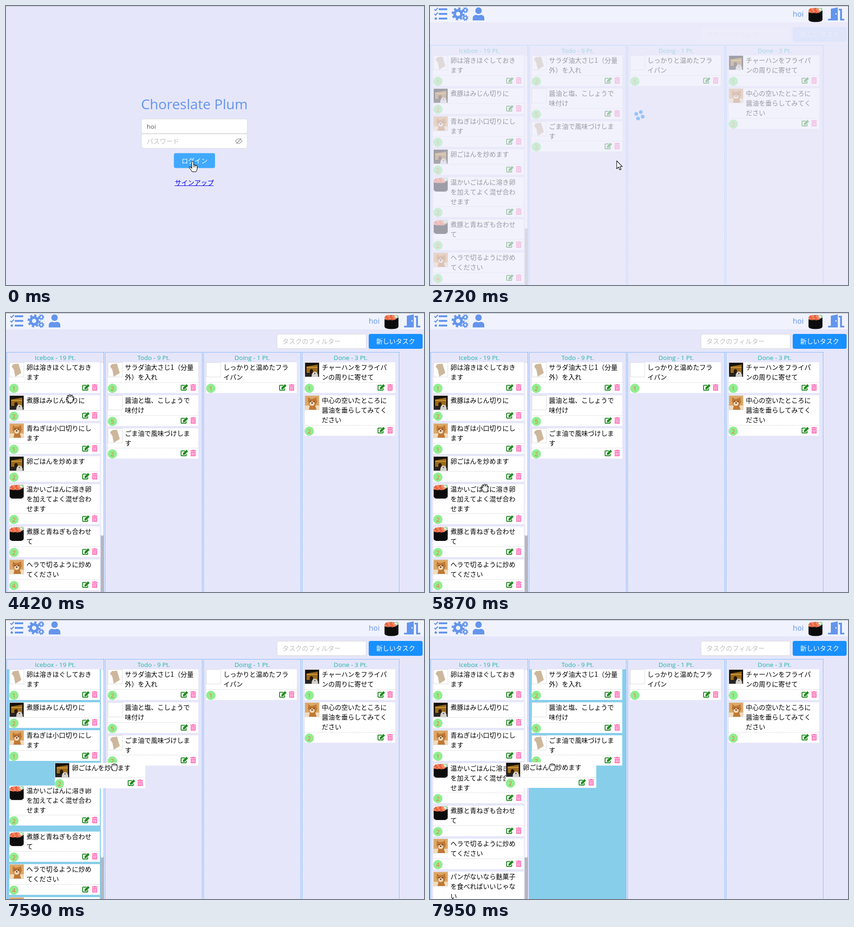
These frames come from a looping animation (900x600 px, 8000 ms). An HTML page with a canvas:

```html
<!DOCTYPE html>
<html lang="ja">
<head>
<meta charset="utf-8">
<style>
html, body { margin: 0; width: 100%; height: 100%; overflow: hidden; background: #e6e6fa; }
canvas { display: block; }
</style>
</head>
<body>
<canvas id="stage" width="900" height="600"></canvas>
<script>
const g = document.getElementById('stage').getContext('2d');
const LOOP = 8000, LATIN = '"Open Sans", sans-serif', KANA = '"Noto Sans CJK JP", "Noto Sans CJK", sans-serif';
const USER = 'hoi', BLUE = '#6495ed', PAGE = '#e6e6fa';

// [first change, last change, number of changes]
const runs = [[120, 120, 1], [2120, 2840, 7], [2970, 3690, 7], [4050, 4650, 6], [4900, 5140, 3],
  [5510, 5870, 4], [6370, 6490, 2], [6740, 6980, 3], [7230, 7950, 7]];

// [time, x, y] of the pointer hotspot
const pointerPath = [[0, 402, 334], [120, 403, 334], [2360, 403, 334], [2480, 402, 333], [2970, 402, 333],
  [3330, 401, 320], [3690, 432, 234], [4050, 400, 230], [4290, 190, 192], [4530, 86, 175], [4650, 88, 183],
  [4900, 92, 205], [5140, 113, 294], [5510, 118, 330], [5750, 123, 380], [5870, 118, 376], [6370, 117, 362],
  [6490, 116, 338], [6740, 112, 328], [6980, 106, 315], [7230, 110, 316], [7350, 140, 316], [7590, 233, 316],
  [7710, 250, 316], [7950, 263, 316]];
const dragPath = [[7230, 0, 0], [7350, 10, 0], [7590, 98, -.8], [7710, 130, -1], [7950, 156, -1.6]];

const columns = [
  ['Icebox - 19 Pt.', [
    ['bag', 1, '卵は溶きほぐしておき', 'ます'],
    ['night', 2, '煮豚はみじん切りに'],
    ['dog', 1, '青ねぎは小口切りにし', 'ます'],
    ['night', 2, '卵ごはんを炒めます'],
    ['sushi', 2, '温かいごはんに溶き卵', 'を加えてよく混ぜ合わ', 'せます'],
    ['sushi', 2, '煮豚と青ねぎも合わせ', 'て'],
    ['dog', 4, 'ヘラで切るように炒め', 'てください'],
    ['dog', 2, 'パンがないなら麩菓子', 'を食べればいいじゃな', 'い']]],
  ['Todo - 9 Pt.', [
    ['bag', 2, 'サラダ油大さじ1（分量', '外）を入れ'],
    ['blank', 5, '醤油と塩、こしょうで', '味付け'],
    ['bag', 2, 'ごま油で風味づけしま', 'す']]],
  ['Doing - 1 Pt.', [['blank', 1, 'しっかりと温めたフラ', 'イパン']]],
  ['Done - 3 Pt.', [
    ['night', 1, 'チャーハンをフライパ', 'ンの周りに寄せて'],
    ['dog', 2, '中心の空いたところに', '醤油を垂らしてみてく', 'ださい']]]
];
const DRAGGED = 3;

const cursors = {
  arrow: 'M0 0V17L4 13.3 6.6 19.5 9.4 18.3 6.8 12.2H12Z',
  pointer: 'M-2 2Q-2 0 0 0Q2 0 2 2V8Q4 7 5 8.5Q7 8 7.5 9.5Q9.5 9 9.5 11V17Q9 20 7 22.5H-1Q-3 19-7.5 14Q-7.5 11-4.5 12.5L-2 15Z',
  grab: 'M-3 8L-7.5 0Q-8-2.5-6-2L-4 0-6-5Q-5.5-7.5-3.5-6L-2-3-2-7Q-.5-9.5 1-7L1.5-3 3-7Q5-8 5.5-5.5L5-1.5 6-3Q8.5-4 8-2L6 4 5 9H-3Z',
  fist: 'M-5 0Q-8-1-6 2L-3 8H5L6.5 2V-4Q5-6 4-5Q3-7 1-6Q-1-7.5-2.5-5.5Q-5-6.5-5-4Z'
};
const trash = 'M0 1H4L4.7 0H7.3L8 1H12V3H0ZM.8 4H11.2V14H.8ZM3 5.5V12.5H4V5.5ZM5.5 5.5V12.5H6.5V5.5ZM8 5.5V12.5H9V5.5Z';

const clamp = v => Math.max(0, Math.min(1, v));
const ramp = (t, a, b) => clamp((t - a) / (b - a));

function along(keys, t) {
  let i = 0;
  while (i < keys.length - 2 && keys[i + 1][0] <= t) i++;
  const [a, x, y] = keys[i], [b, x2, y2] = keys[i + 1], k = ramp(t, a, b);
  return [x + (x2 - x) * k, y + (y2 - y) * k];
}

function snap(t) {
  let last = 0;
  for (const [a, b, n] of runs)
    for (let i = 0; i < n; i++) {
      const step = a + (n > 1 ? (b - a) * i / (n - 1) : 0);
      if (step <= t + 10) last = step;
    }
  return last;
}

function rect(x, y, w, h, color) { g.fillStyle = color; g.fillRect(x, y, w, h); }
function disc(x, y, r, color, ry = r, turn = 0) {
  g.fillStyle = color;
  g.beginPath(); g.ellipse(x, y, r, ry, turn, 0, 7); g.fill();
}
function box(x, y, w, h, color, border) {
  g.beginPath(); g.roundRect(x, y, w, h, 4);
  g.fillStyle = color; g.fill();
  if (border) { g.strokeStyle = border; g.lineWidth = 1; g.stroke(); }
}
function text(s, x, y, size, color, family = KANA, align = 'left') {
  g.font = `${family === KANA ? 350 : 400} ${size}px ${family}`;
  g.fillStyle = color; g.textAlign = align;
  g.fillText(s, x, y);
}
function line(points, color, width = 1, dash = []) {
  g.beginPath();
  for (let i = 0; i < points.length; i += 2) g.lineTo(points[i], points[i + 1]);
  g.strokeStyle = color; g.lineWidth = width; g.setLineDash(dash);
  g.stroke(); g.setLineDash([]);
}
function shape(d, x, y, fill, stroke, width = 1) {
  const p = new Path2D(d);
  g.save(); g.translate(x, y);
  if (fill) { g.fillStyle = fill; g.fill(p, 'evenodd'); }
  if (stroke) { g.strokeStyle = stroke; g.lineWidth = width; g.lineJoin = 'round'; g.stroke(p); }
  g.restore();
}

function sushi(x, y) {
  shape('M1 8V27Q2 32 16 32T31 27V8Z', x, y, '#0c0c0c');
  disc(x + 16, y + 8, 15, '#222', 6);
  disc(x + 23, y + 6, 9, '#e9f5e4', 4.5, -.3);
  disc(x + 24, y + 5.5, 7, '#65b96a', 3, -.3);
  disc(x + 24, y + 5.5, 5.5, '#eef8e6', 2, -.3);
  for (let i = 0; i < 9; i++)
    disc(x + 4 + i % 5 * 4.6 + (i > 4 ? 2 : 0), y + (i > 4 ? 4.5 : 9) + i % 2, 3.1, i % 2 ? '#f0623c' : '#f58a68');
}

const pictures = {
  blank() {},
  sushi,
  bag(x, y) {
    shape('M5 9L9 4 20 3 26 23 13 31 10 16Z', x, y, '#cdb79c');
  },
  night(x, y) {
    rect(x, y, 32, 32, '#15120f');
    shape('M4 9L28 5V23H4Z', x, y, '#9a6a1c');
    rect(x + 4, y + 10, 24, 2, '#d09a38');
    shape('M11 24V17Q15 12 18 17V24Z', x, y, '#2a1b0c');
    rect(x, y + 24, 32, 8, '#262423');
    shape('M15 32Q15 20 22 20T29 32Z', x, y, '#d6d2ca');
    disc(x + 22, y + 24, 1.2, '#333');
  },
  dog(x, y) {
    rect(x, y, 32, 32, '#dca768');
    rect(x, y + 22, 32, 10, '#f0dcbc');
    shape('M7 13L8 4 13 8 20 7 25 4 27 14 23 23 26 32H9L11 23Z', x, y, '#c07834');
    disc(x + 16, y + 18, 5.5, '#efd6b4', 4.5);
    disc(x + 12.5, y + 13, 1, '#2b1a10');
    disc(x + 20, y + 13, 1, '#2b1a10');
    disc(x + 16, y + 16.5, 1.6, '#2b1a10', 1.2);
  }
};

const cardHeight = card => [55, 65.7, 86.7][card.length - 3];

function drawCard(card, x, top) {
  const [picture, points, ...lines] = card;
  const y = Math.round(top), bottom = Math.round(top + cardHeight(card));
  rect(x, y, 195, bottom - y, '#fff');
  pictures[picture](x, y);
  g.strokeStyle = '#ddd'; g.lineWidth = 1;
  g.strokeRect(x + .5, y + .5, 31, 31);
  lines.forEach((s, i) => text(s, x + 37, y + 16 + 21 * i, 14, '#000'));
  const ruleY = bottom - 22.5;
  line([x, ruleY, x + 195, ruleY], '#ccc', 1, [1, 1]);
  disc(x + 10, bottom - 10, 10, '#90ee90');
  text(points, x + 10, bottom - 5, 13, '#ff6347', LATIN, 'center');
  const iconY = bottom - 19;
  shape('M9 2.5H2Q1 2.5 1 3.5V12Q1 13 2 13H11Q12 13 12 12V9', x + 157, iconY, null, '#228b22', 1.9);
  shape('M5 7.5L12.5 0 16 3.5 8.5 11H5Z', x + 157, iconY, '#228b22');
  shape(trash, x + 178, iconY, '#ff69b4');
}

function gear(x, y, r) {
  g.strokeStyle = BLUE;
  g.lineWidth = r * .42;
  g.beginPath(); g.arc(x, y, r * .54, 0, 7); g.stroke();
  g.lineWidth = r * .3;
  const tooth = Math.PI * r * .85 / 8;
  g.setLineDash([tooth, tooth]);
  g.beginPath(); g.arc(x, y, r * .85, 0, 2 * Math.PI); g.stroke();
  g.setLineDash([]);
}

function drawHeader() {
  rect(0, 0, 900, 35, '#f0f3fd');
  for (const y of [7, 17, 27]) rect(19, y - 2, 18, 4, BLUE);
  for (const y of [7, 17]) line([9.5, y, 12, y + 2.5, 17, y - 3], BLUE, 2.4);
  disc(12.5, 27, 2.6, BLUE);
  gear(60.5, 17, 14);
  gear(76, 9, 6.5);
  gear(76, 25.5, 6.5);
  disc(104.5, 10, 7, BLUE);
  shape('M92 31V27Q92 19 100 19Q104.500 21 109 19Q117 19 117 27V31Z', 0, 0, BLUE);
  text(USER, 781, 23, 16, BLUE, LATIN);
  sushi(814, 2.5);
  shape('M857 27.500H863V6L878 3V31H857ZM873 15.500H875.500V18.500H873ZM880 6H887V27.500H892V31H883V9.500H880Z', 0, 0, BLUE);
}

function drawToolbar() {
  box(583.5, 45.5, 192, 31, '#fff', '#d9d9d9');
  text('タスクのフィルター', 595, 66, 14, '#bfbfbf');
  box(781, 45, 116, 32, '#1890ff');
  text('新しいタスク', 839, 66, 14, '#fff', KANA, 'center');
}

function drawBoard(t) {
  const dragging = t >= 7350;
  const target = dragging ? (t >= 7710 ? 1 : 0) : -1;
  let lifted;
  columns.forEach(([title, cards], c) => {
    const x = 1 + 212 * c;
    if (c === target) rect(x + 1, 106, 208, 494, '#87ceeb');
    line([x, 84.5, x + 210, 84.5], '#1e90ff', 1, [1, 1]);
    for (const side of [x + .5, x + 209.5]) line([side, 84, side, 600], '#1e90ff', 1, [1, 1]);
    text(title, x + 105, 101, 13.5, '#20b2aa', LATIN, 'center');
    let y = 106.2;
    cards.forEach((card, i) => {
      if (c === 0 && i === DRAGGED && dragging) lifted = [card, x + 6, y];
      else {
        const start = i === DRAGGED + 1 ? 7550 : 7574;
        const shift = c === 0 && i > DRAGGED ? 60 * ramp(t, start, start + 200) : 0;
        drawCard(card, x + 6, y - shift);
      }
      y += cardHeight(card) + 5;
    });
    if (c === 0) {
      rect(204, 106, 6, 494, '#b4b7be');
      box(204, 106, 6, dragging ? 405 : 373, '#fafaff');
    }
  });
  if (lifted) {
    const [dx, dy] = along(dragPath, t);
    drawCard(lifted[0], Math.round(lifted[1] + dx), lifted[2] + dy);
  }
}

function wash(y, h, amount) { rect(0, y, 900, h, `rgba(236,235,250,${amount})`); }

function drawSpinner(t, alpha) {
  for (let i = 0; i < 4; i++) {
    const a = ((t - 2720) * .3 - 67 + 90 * i) * Math.PI / 180;
    disc(451 + 7.5 * Math.cos(a), 235 + 7.5 * Math.sin(a), 3.9, `rgba(24,144,255,${alpha})`);
  }
}

function drawApp(t) {
  drawHeader();
  drawToolbar();
  drawBoard(t);
  const shown = ramp(t, 2840, 3350);
  if (shown < 1) {
    wash(35, 49, .94 * (1 - ramp(t, 2720, 3350)));
    wash(84, 516, .65 * (1 - shown));
    drawSpinner(t, .42 * (1 - ramp(t, 2840, 3200)));
  }
}

function drawLogin(t) {
  text('Choreslate Plum', 405.5, 222, 30, BLUE, LATIN, 'center');
  box(291.5, 243, 228, 31, '#fff', '#d9d9d9');
  box(291.5, 275, 228, 31, '#fff', '#d9d9d9');
  text(USER, 303, 264, 13.5, '#595959', LATIN);
  if (t >= 2120) rect(322, 249, 1, 19, '#333');
  text('パスワード', 303, 296, 14, '#bfbfbf');
  shape('M494 290.500Q501 280.500 508 290.500Q501 300.500 494 290.500ZM496 296.500L506.500 284.500', 0, 0, null, '#8c8c8c', 1.2);
  g.beginPath(); g.arc(501, 290.5, 2.4, 0, 7); g.stroke();
  box(361.5, 316.5, 88.5, 32, '#40a9ff');
  text('ログイン', 406, 338, 14, '#fff', KANA, 'center');
  text('サインアップ', 405.5, 385, 14, '#0000ee', KANA, 'center');
  rect(363, 386, 84, 1, '#0000ee');
}

function drawCursor(t) {
  const [x, y] = along(pointerPath, t);
  const overCard = x < 203 || (x > 218 && x < 414 && y < 313);
  const kind = t < 2480 ? 'pointer' : t >= 7230 ? 'fist' : overCard ? 'grab' : 'arrow';
  shape(cursors[kind], x, y, '#fff', '#000', 1.1);
  if (kind === 'pointer') for (const dx of [2, 5]) line([x + dx, y + 9, x + dx, y + 13], '#000');
  if (kind === 'fist') for (const dx of [-2, 1, 4]) line([x + dx, y - 5, x + dx, y - 2], '#000');
}

function draw(now) {
  const t = snap(now % LOOP);
  rect(0, 0, 900, 600, PAGE);
  if (t < 2480) drawLogin(t); else drawApp(t);
  rect(0, 0, 900, 1, '#b4b4bc');
  drawCursor(t);
  requestAnimationFrame(() => draw(performance.now()));
}
draw(0);
</script>
</body>
</html>
```
